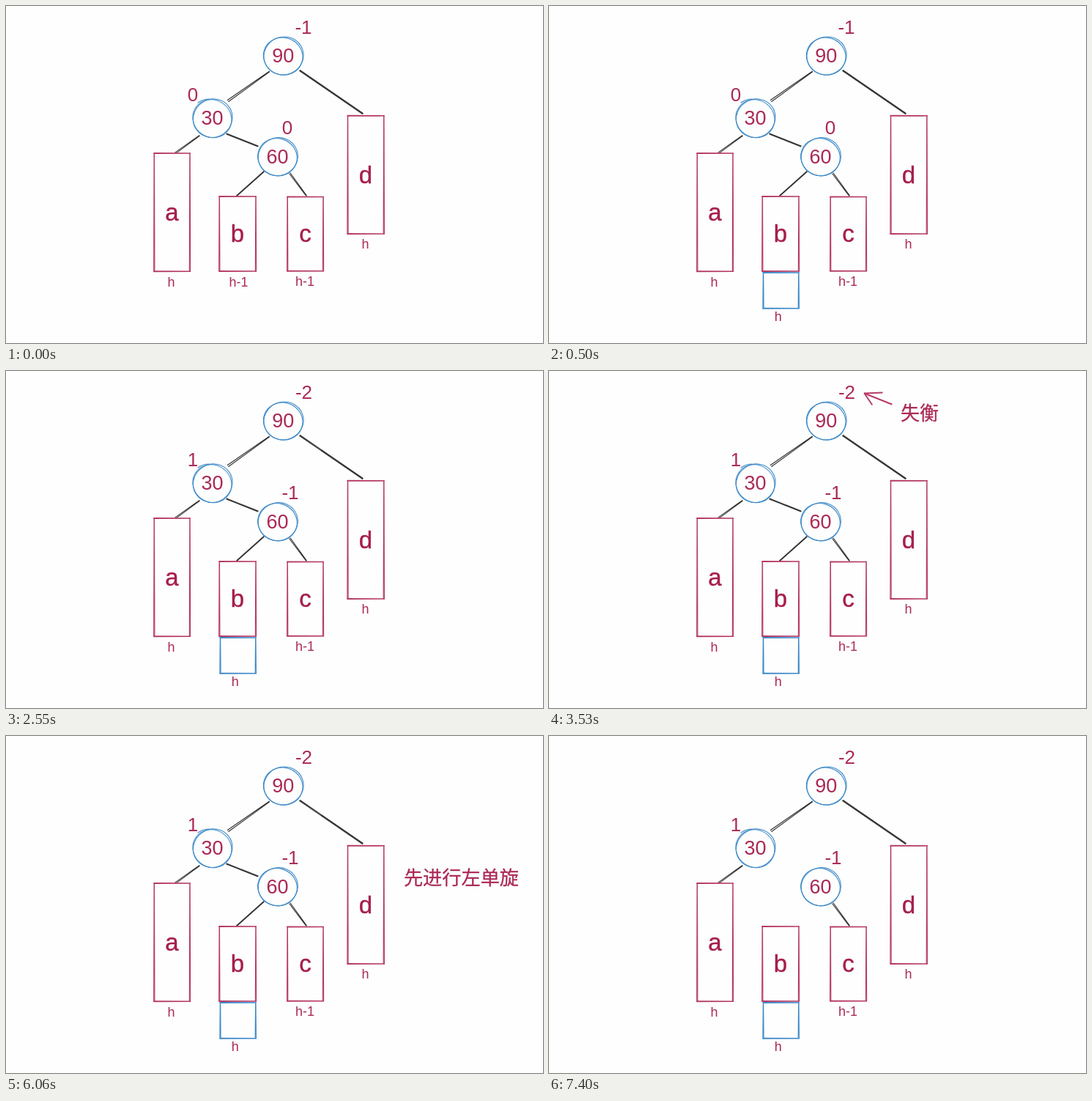
Write an HTML page that moves like this. It is 733 by 460 pixels and loops after 8000 ms.

```html
<!DOCTYPE html>
<html lang="zh-CN">
<head>
<meta charset="utf-8">
<title>AVL rotation</title>
<style>
  html, body { margin: 0; width: 100%; height: 100%; overflow: hidden; background: #fefefe; }
  svg { display: block; }
  path, ellipse { fill: none; stroke-width: 1.1; stroke-linecap: round; }
  text { fill: #ab2a57; font-family: "Liberation Sans", Arial, sans-serif; text-anchor: middle; }
  .big { fill: #a61e4d; stroke: #a61e4d; stroke-width: .4; }
  .zh { font-family: "Noto Sans CJK SC", "Noto Sans CJK", sans-serif; stroke: #ab2a57; stroke-width: .3; }
</style>
</head>
<body>
<svg id="stage" width="733" height="460" viewBox="0 0 733 460"></svg>
<script>
const LOOP = 8000;
const RED = '#b53a66', BLUE = '#3f8ac8', DARK = '#333';
const stage = document.getElementById('stage');
const timed = [];

function add(parent, tag, attrs, content = '') {
  const el = document.createElementNS('http://www.w3.org/2000/svg', tag);
  for (const key in attrs) el.setAttribute(key, attrs[key]);
  el.textContent = content;
  return parent.appendChild(el);
}

// A group that is visible from one time up to another
function during(from, to) {
  const el = add(stage, 'g', {});
  timed.push({ el, from, to });
  return el;
}

const text = (g, x, y, size, str, cls = '') =>
  add(g, 'text', { x, y, 'font-size': size, class: cls }, str);

// Hand-drawn line: two strokes, gap1 and gap2 apart at the ends
function line(g, x1, y1, x2, y2, color = RED, gap1 = .8, gap2 = gap1) {
  const len = Math.hypot(x2 - x1, y2 - y1);
  const nx = (y1 - y2) / len / 2, ny = (x2 - x1) / len / 2;
  const stroke = side =>
    `M${x1 + nx * gap1 * side} ${y1 + ny * gap1 * side}L${x2 + nx * gap2 * side} ${y2 + ny * gap2 * side}`;
  add(g, 'path', { stroke: color, d: stroke(1) + stroke(-1) });
}

function box(g, x, y, w, h, color = RED) {
  const r = x + w, b = y + h;
  line(g, x - .5, y, r + .5, y, color, 1, .5);
  line(g, r, y, r, b, color, .4, 1.3);
  line(g, r + .5, b, x - .5, b, color, .5, 1);
  line(g, x, b, x, y, color, 1.3, .4);
}

function node(x, y, value, tilt) {
  add(stage, 'ellipse', { cx: x - .4, cy: y + .4, rx: 27, ry: 25.4, stroke: BLUE,
    transform: `rotate(${tilt} ${x} ${y})` });
  add(stage, 'ellipse', { cx: x + .4, cy: y - .2, rx: 27.2, ry: 25.8, stroke: BLUE,
    transform: `rotate(${-tilt} ${x} ${y})` });
  text(stage, x - .5, y + 8.5, 27, value);
}

function leaf(x, y, w, h, name, tx, ty) {
  box(stage, x, y, w, h);
  text(stage, tx, ty, 33, name, 'big');
}

// Tree
line(stage, 359.5, 89.5, 303, 129.5, DARK, .8, 2.4);
line(stage, 401, 88, 487, 147, DARK, 1.2);
line(stage, 264, 177, 231.5, 200.5, DARK, .8, 1.6);
line(stage, 387.5, 228.5, 410, 259, DARK, 1.6, .8);
const cut = during(0, 7400);
line(cut, 301, 174.5, 344, 191.5, DARK, .8);
line(cut, 352, 226, 315, 259, DARK, .8);

node(378.7, 68.3, '90', 20);
node(282, 153.6, '30', 35);
add(stage, 'path', { stroke: BLUE, d: 'M262 132Q269 127 277 127' });
node(371, 206, '60', 20);

leaf(202.3, 201, 48.7, 161.2, 'a', 226.5, 293);
leaf(291.3, 260, 49.7, 102, 'b', 316, 321.5);
leaf(384.2, 260.5, 48.8, 101.3, 'c', 408.5, 321.5);
leaf(466.5, 149.8, 49.3, 161.2, 'd', 491, 241.5);
text(stage, 225.5, 383, 18, 'h');
text(stage, 490.5, 331, 18, 'h');
text(stage, 408, 382, 18, 'h-1');

// Insertion under b
text(during(0, 500), 317.5, 383, 18, 'h-1');
const inserted = during(500, LOOP);
box(inserted, 292.5, 364, 48.3, 48.7, BLUE);
text(inserted, 312.7, 430, 18, 'h');

// Balance factors
const before = during(0, 2550);
text(before, 406, 38, 26, '-1');
text(before, 255, 130, 26, '0');
text(before, 384, 174.5, 26, '0');
const struck = during(1460, 2550);
line(struck, 390, 13, 426, 45);
line(struck, 228, 109.5, 271, 126);
line(struck, 363, 148.5, 402, 175.5);
const after = during(2550, LOOP);
text(after, 406.5, 38, 26, '-2');
text(after, 255, 130, 26, '1');
text(after, 388, 175, 26, '-1');

// Notes
const alarm = during(3530, 4560);
line(alarm, 468, 45.5, 430.5, 30.5);
line(alarm, 455, 29.5, 430.5, 30.5);
line(alarm, 441, 46, 430.5, 30.5);
text(alarm, 506, 67, 26, '失衡', 'zh');
text(during(4560, 6060), 621.5, 202.5, 26.2, '进行左右双旋', 'zh');
text(during(6060, 7400), 621.5, 202.5, 26.2, '先进行左单旋', 'zh');

function draw(now) {
  const t = now % LOOP;
  for (const { el, from, to } of timed)
    el.setAttribute('visibility', t >= from && t < to ? 'visible' : 'hidden');
}

const start = performance.now();
function tick() {
  draw(performance.now() - start);
  requestAnimationFrame(tick);
}
tick();
</script>
</body>
</html>
```
